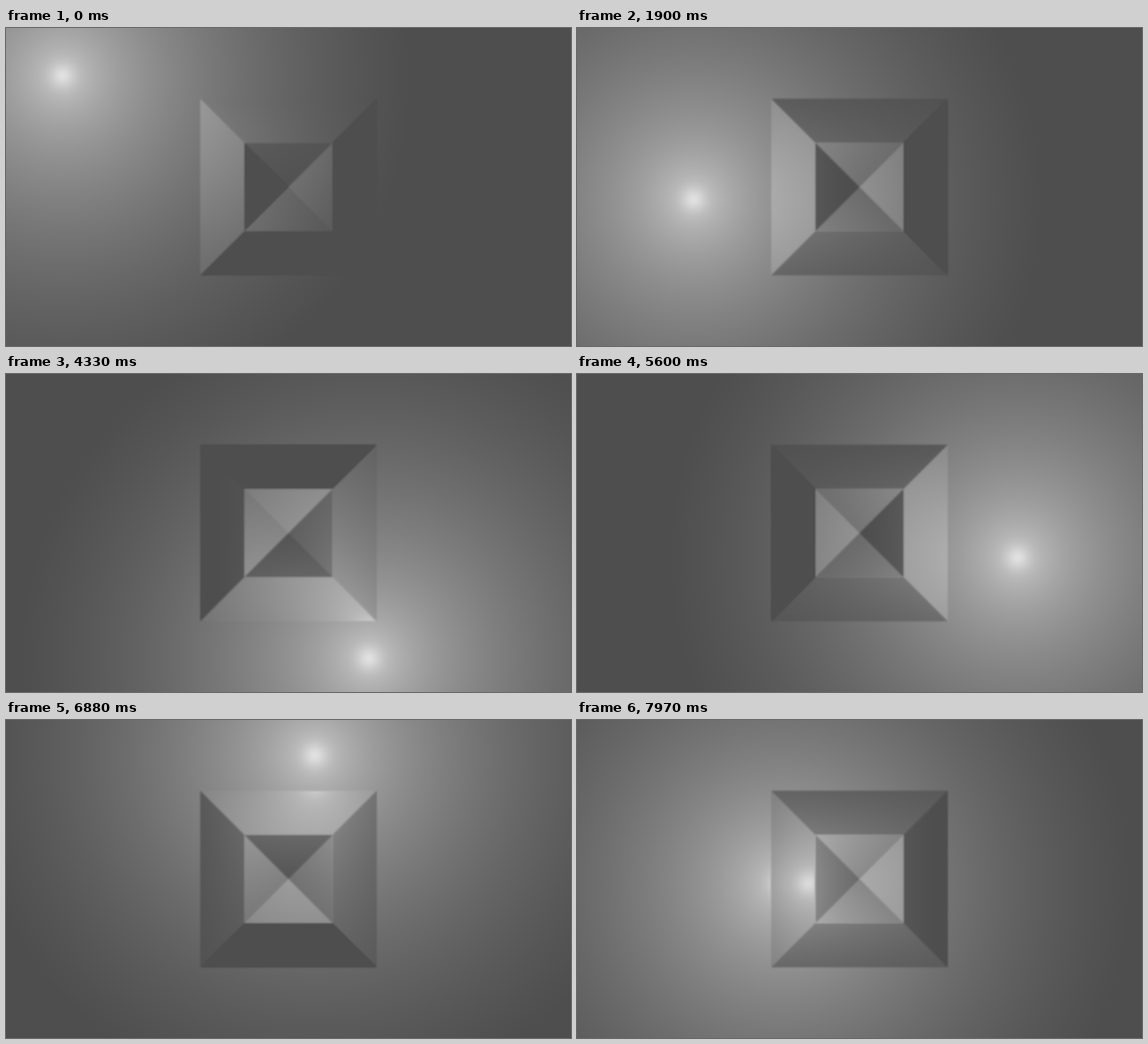
These frames come from a looping animation (640 px wide and 360 px high, 8 s). An HTML page with a canvas:

```html
<!DOCTYPE html>
<html lang="en">
<head>
<meta charset="utf-8">
<title>Bevelled square under a moving light</title>
<style>
  html, body { margin: 0; width: 100%; height: 100%; overflow: hidden; background: #4e4e4e; }
  canvas { display: block; width: 640px; height: 360px; }
</style>
</head>
<body>
<canvas id="stage" width="640" height="360"></canvas>
<script>
const W = 640, H = 360, LOOP = 8000;
const BOX = { x: 214, y: 74, w: 212, h: 212 };
const AMBIENT = 78, DIFFUSE = 88, REACH = 395, LIGHT_HEIGHT = 250;
const FACING = 0.85, TILT = 0.005, GLINT_SHIFT = 30;

const ctx = document.getElementById("stage").getContext("2d");
const image = ctx.createImageData(W, H);
const pixels = new Uint32Array(image.data.buffer);

// Light path: time, x, y
const path = [
  [0, 64, 54], [1900, 132, 194], [3180, 239, 313], [4330, 411, 322],
  [5600, 499, 208], [6880, 350, 40], [7970, 232, 185]
];
const startSpeed = [0, 0.014, 0.072], endSpeed = [0, -0.03, 0.13];

function speed(i, axis) {
  if (i === 0) return startSpeed[axis];
  if (i === path.length - 1) return endSpeed[axis];
  const a = path[i - 1], b = path[i + 1];
  return (b[axis] - a[axis]) / (b[0] - a[0]);
}

function lightAt(t) {
  let i = 0;
  while (i < path.length - 2 && t >= path[i + 1][0]) i++;
  const a = path[i], b = path[i + 1], span = b[0] - a[0];
  const u = Math.min(1, (t - a[0]) / span), v = 1 - u;
  return [1, 2].map(k =>
    a[k] * (1 + 2 * u) * v * v + b[k] * (3 - 2 * u) * u * u +
    span * u * v * (speed(i, k) * v - speed(i + 1, k) * u));
}

// Radial profiles, sampled four times per pixel of distance
const SAMPLES = 4, SIZE = 900 * SAMPLES;
const diffuse = new Float32Array(SIZE), glint = new Float32Array(SIZE);
for (let i = 0; i < SIZE; i++) {
  const d = i / SAMPLES;
  diffuse[i] = DIFFUSE * Math.max(0, 1 - d / REACH) * LIGHT_HEIGHT / Math.hypot(d, LIGHT_HEIGHT);
  glint[i] = 22 * Math.exp(-d * d / 180) + 42 * Math.exp(-Math.hypot(d, 5) / 38);
}
const sample = (table, x, y) => table[Math.sqrt(x * x + y * y) * SAMPLES | 0];

// Raised outer bevel, sunken inner pyramid
function faceAt(x, y) {
  const dx = x + 0.5 - 320, dy = y + 0.5 - 180;
  const ax = Math.abs(dx), ay = Math.abs(dy), r = Math.max(ax, ay);
  if (r > 100) return [0, 0];
  const sign = r > 50 ? 1 : -1;
  if (ax === ay) return [sign * Math.sign(dx) / 2, sign * Math.sign(dy) / 2];
  return ax > ay ? [sign * Math.sign(dx), 0] : [0, sign * Math.sign(dy)];
}

function softNormals() {
  const kernel = [1, 4, 6, 4, 1];
  const nx = new Float32Array(BOX.w * BOX.h), ny = new Float32Array(BOX.w * BOX.h);
  for (let y = 0; y < BOX.h; y++) {
    for (let x = 0; x < BOX.w; x++) {
      const i = y * BOX.w + x;
      for (let j = 0; j < 5; j++) {
        for (let k = 0; k < 5; k++) {
          const weight = kernel[j] * kernel[k] / 256;
          const face = faceAt(BOX.x + x + k - 2, BOX.y + y + j - 2);
          nx[i] += face[0] * weight;
          ny[i] += face[1] * weight;
        }
      }
    }
  }
  return { nx, ny };
}
const { nx, ny } = softNormals();

function shade(x, y, lx, ly) {
  const dx = x + 0.5 - lx, dy = y + 0.5 - ly;
  const bx = x - BOX.x, by = y - BOX.y;
  let sx = 0, sy = 0;
  if (bx >= 0 && by >= 0 && bx < BOX.w && by < BOX.h) {
    const i = by * BOX.w + bx;
    sx = nx[i];
    sy = ny[i];
  }
  const steep = Math.min(1, Math.abs(sx) + Math.abs(sy));
  const facing = 1 - (1 - FACING) * steep - TILT * (sx * dx + sy * dy);
  return AMBIENT + sample(diffuse, dx, dy) * Math.max(0, facing) +
    sample(glint, dx + GLINT_SHIFT * sx, dy + GLINT_SHIFT * sy);
}

function draw(t) {
  const [lx, ly] = lightAt(t);
  for (let y = 0, p = 0; y < H; y++) {
    for (let x = 0; x < W; x++, p++) {
      const v = Math.min(255, shade(x, y, lx, ly) + 0.5) | 0;
      pixels[p] = 0xff000000 | v << 16 | v << 8 | v;
    }
  }
  ctx.putImageData(image, 0, 0);
}

const start = performance.now();
function tick() {
  draw((performance.now() - start) % LOOP);
  requestAnimationFrame(tick);
}
tick();
</script>
</body>
</html>
```
